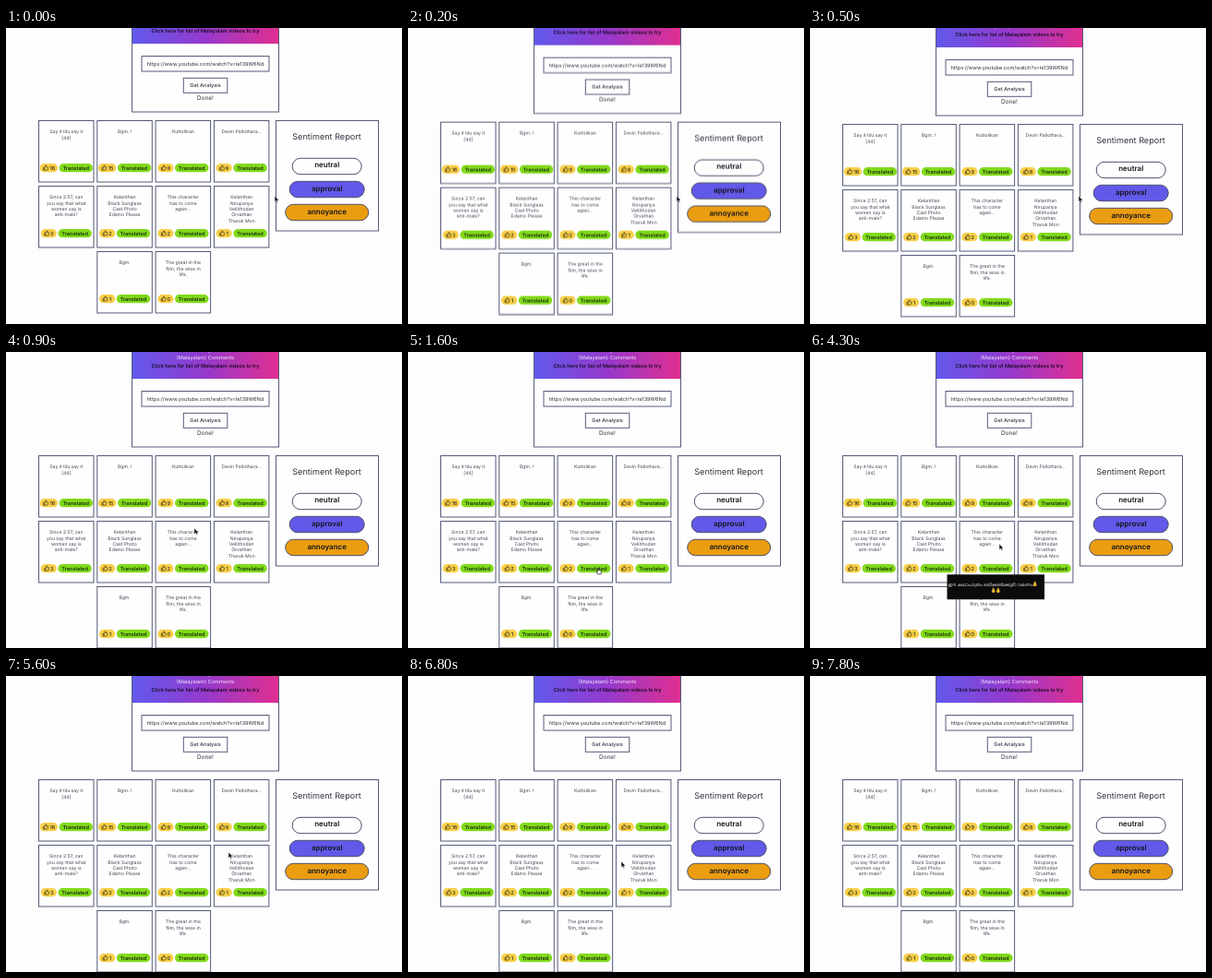
Recreate the animation shown at these times as an HTML page. Size 429 px wide and 321 px high, loop 7900 ms.

```html
<!DOCTYPE html>
<html lang="en">
<head>
<meta charset="utf-8">
<title>Comment sentiment report</title>
<style>
  html, body { margin: 0; width: 100%; height: 100%; overflow: hidden; background: #fdfdfe; }
  svg { display: block; width: 100%; height: 100%; }
  text {
    font: 5.6px Inter, Roboto, sans-serif;
    text-anchor: middle;
    text-rendering: geometricPrecision;
    fill: #30343f;
  }
  .line { fill: #fefeff; stroke: #555a78; }
  .white { fill: #f3eaff; }
  .link { fill: #0b0612; font-weight: 500; }
  .medium { font-weight: 500; }
  .comment { font-size: 5.1px; fill: #454955; }
  .badge { font-weight: 600; fill: #17300a; }
  .count { font-weight: 500; fill: #33290c; }
  .title { font-size: 9.1px; }
  .pill { stroke: #4b4f68; }
  .label { font-size: 8px; font-weight: 600; fill: #15151c; }
  .tip text { font: 500 4.9px "Noto Sans Malayalam", "Noto Sans", sans-serif; fill: #ddd; }

  .page, .cursor, .arrow, .hand, .tip { animation: 7.9s linear infinite; }
  .page { animation-name: scroll; }
  .cursor { animation-name: travel; }
  .arrow { animation-name: point; animation-timing-function: step-end; }
  .hand { animation-name: grab; animation-timing-function: step-end; }
  .tip { animation-name: hint; }

  @keyframes scroll {
    0% { transform: translateY(-12px); animation-timing-function: steps(5); }
    6.329% { transform: translateY(-8px); animation-timing-function: steps(3); }
    10.126%, 100% { transform: translateY(0); }
  }
  @keyframes travel {
    0%, 6.329% { transform: translate(291px, 182px); animation-timing-function: steps(4); }
    11.392% { transform: translate(204px, 191px); animation-timing-function: steps(7); }
    20.253%, 50.632% { transform: translate(206px, 234px); animation-timing-function: steps(3); }
    54.43% { transform: translate(205px, 208px); animation-timing-function: steps(4); }
    59.493%, 65.822% { transform: translate(208px, 201px); animation-timing-function: steps(4); }
    70.886% { transform: translate(241px, 191px); animation-timing-function: steps(3); }
    74.683% { transform: translate(233px, 197px); animation-timing-function: steps(2); }
    77.215%, 86.075% { transform: translate(231px, 201px); animation-timing-function: steps(3); }
    89.873%, 92.405% { transform: translate(15px, 308px); animation-timing-function: steps(2); }
    94.936%, 100% { transform: translate(12px, 330px); }
  }
  @keyframes point { 0% { opacity: 1; } 20.253% { opacity: 0; } 50.632%, 100% { opacity: 1; } }
  @keyframes grab { 0% { opacity: 0; } 20.253% { opacity: 1; } 50.632%, 100% { opacity: 0; } }
  @keyframes hint {
    0%, 24.05% { opacity: 0; animation-timing-function: steps(4); }
    29.113%, 54.43% { opacity: 1; animation-timing-function: steps(4); }
    59.493%, 100% { opacity: 0; }
  }
</style>
</head>
<body>
<svg viewBox="0 0 429 321">
  <defs>
    <linearGradient id="banner">
      <stop offset="0" stop-color="#6159ec"/>
      <stop offset=".5" stop-color="#9639cc"/>
      <stop offset="1" stop-color="#e02f90"/>
    </linearGradient>
    <path id="thumb" d="M0 2.4H1.2V5.2H0ZM1.2 2.5 2.5 0Q3.5 0 3.3 1L3 2H4.8Q5.3 2.1 5.1 2.8L4.6 4.7Q4.5 5.2 4 5.2H1.2" fill="none" stroke="#3d310c" stroke-width=".65" stroke-linejoin="round"/>
    <path id="palms" d="M0 -3.2 1 -1.2 1.9 1.2 .9 2.6H-.9L-1.9 1.2 -1 -1.2Z" fill="#e9b83f" stroke="#9b701d" stroke-width=".3"/>
  </defs>

  <g class="page">
    <rect class="line" x="136.5" y="-20" width="159" height="123"/>
    <rect x="137" y="-20" width="158" height="49" fill="url(#banner)"/>
    <text class="white" x="216" y="0">Sentiment Analysis of Video</text>
    <text class="white" x="216" y="8.4">(Malayalam) Comments</text>
    <text class="link" x="216" y="17.1">Click here for list of Malayalam videos to try</text>
    <rect class="line" x="147" y="42.5" width="138" height="16.5"/>
    <text x="216" y="53">https://www.youtube.com/watch?v=Ie139W6Nd</text>
    <rect class="line" x="192.3" y="66.3" width="47.5" height="16"/>
    <text class="medium" x="216" y="76.4">Get Analysis</text>
    <text x="216" y="90" style="font-size:6.4px">Done!</text>

    <g id="cards"></g>

    <rect class="line" x="292.5" y="112.5" width="111" height="119.5"/>
    <text class="title" x="347.5" y="133">Sentiment Report</text>
    <g id="report"></g>
  </g>

  <g class="tip">
    <rect x="148.5" y="241.3" width="105.5" height="27" fill="#0b0b0c"/>
    <text x="197.5" y="253.6">ഈ കഥാപാത്രം ഒരിക്കൽക്കൂടി വരണം...</text>
    <use href="#palms" x="243.7" y="251.5"/>
    <use href="#palms" x="198.7" y="258.5"/>
    <use href="#palms" x="203.8" y="258.5"/>
  </g>

  <g class="cursor">
    <path class="arrow" d="M0 0V6.6L1.5 5.3 2.5 7.5 3.6 7 2.7 4.9H4.7Z" fill="#111" stroke="#fff" stroke-width=".5"/>
    <path class="hand" d="M-.6 .6Q0 -.2 .6 .6V2.6L3.2 3.3Q3.7 3.6 3.4 4.8L2.8 7H-.2L-2 4.5Q-1.9 3.7 -.6 4.5Z" fill="#fff" stroke="#111" stroke-width=".7"/>
  </g>
</svg>
<script>
  const comments = [
    [0, 0, 16, "Say it tilu say it", "[44]"],
    [1, 0, 15, "Bgm..!"],
    [2, 0, 9, "Kuttolikan"],
    [3, 0, 8, "Devin Pallothara..."],
    [0, 1, 3, "Since 2:57, can", "you say that what", "women say is", "anti-male?"],
    [1, 1, 2, "Kelanthan", "Black Sunglass", "Cast Photo", "Edamo Please"],
    [2, 1, 2, "This character", "has to come", "again..."],
    [3, 1, 1, "Kelanthan", "Nirupanya", "Vellithodan", "Orvathan", "Tharuk Mon"],
    [1, 2, 1, "Bgm."],
    [2, 2, 0, "The great in the", "film, the wise in", "life."]
  ];
  const feelings = [
    ["neutral", 75, "#fefeff"],
    ["approval", 81, "#6259e9"],
    ["annoyance", 90, "#eb9d12"]
  ];

  const label = (cls, x, y, text) => `<text class="${cls}" x="${x}" y="${y}">${text}</text>`;
  const capsule = (x, y, w, h, fill, cls = "") =>
    `<rect class="${cls}" x="${x}" y="${y}" width="${w}" height="${h}" rx="${h / 2}" fill="${fill}"/>`;

  function card([col, row, likes, ...lines]) {
    const x = 35.5 + col * 63.3, y = 112.5 + row * 71, mid = x + 29.8;
    const likeWidth = likes > 9 ? 19.5 : 17.2;
    const left = mid - (likeWidth + 38) / 2, green = left + likeWidth + 1.5;
    return `<rect class="line" x="${x}" y="${y}" width="59.5" height="66.5"/>` +
      lines.map((line, i) => label("comment", mid, y + 13.8 + i * 6.3, line)).join("") +
      capsule(left, y + 46.6, likeWidth, 9.2, "#f7cf4a") +
      `<use href="#thumb" x="${left + 4}" y="${y + 48.4}"/>` +
      label("count", left + (likes > 9 ? 13.8 : 12), y + 53.2, likes) +
      capsule(green, y + 46.6, 36.5, 9.2, "#82d91c") +
      label("badge", green + 18.2, y + 53.2, "Translated");
  }

  const feeling = ([name, width, fill], i) =>
    capsule(347.7 - width / 2, 153.3 + i * 25, width, 17.4, fill, "pill") +
    label("label", 347.7, 163.4 + i * 25.2, name);

  document.getElementById("cards").innerHTML = comments.map(card).join("");
  document.getElementById("report").innerHTML = feelings.map(feeling).join("");
</script>
</body>
</html>
```
